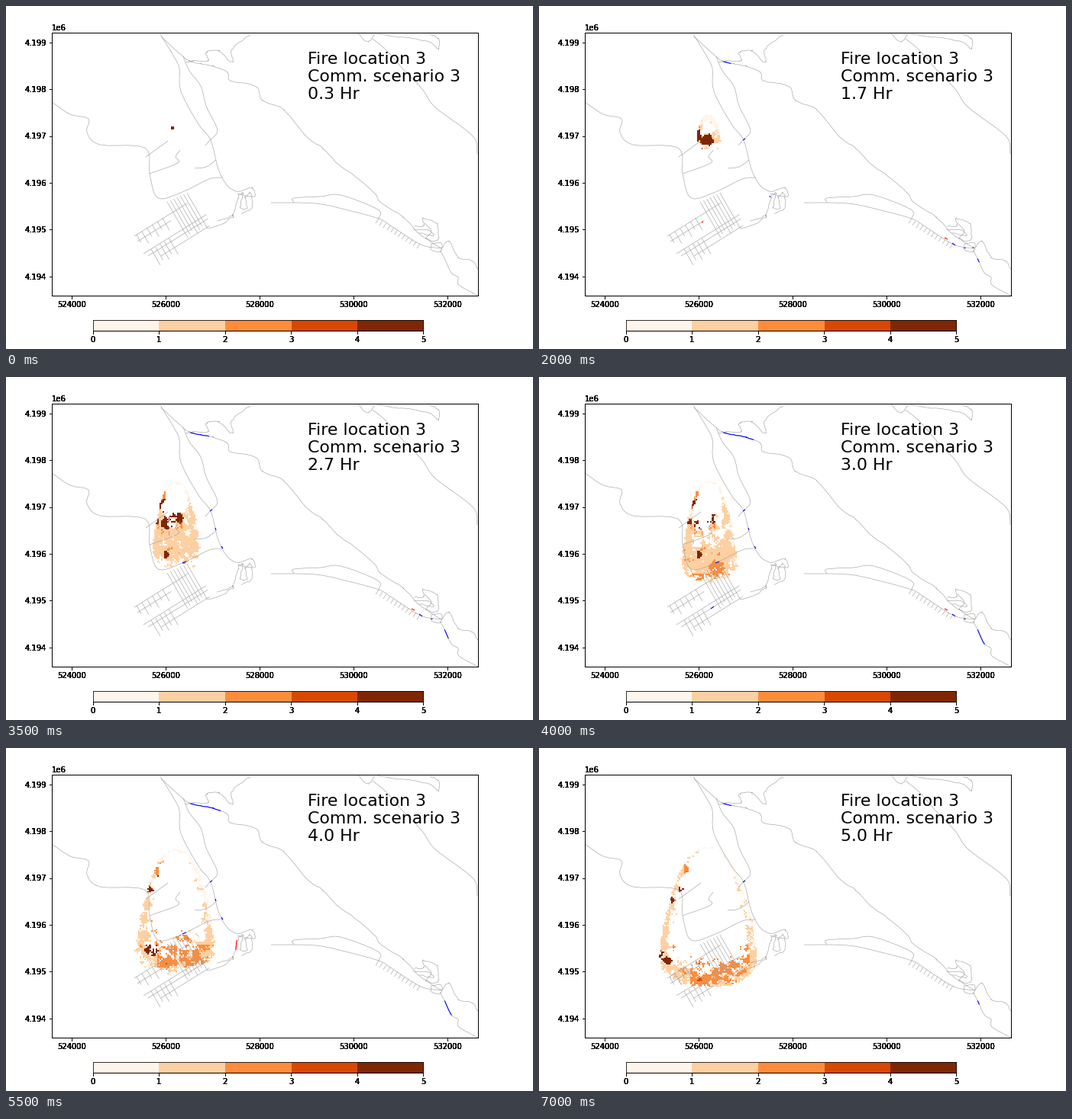
These frames come from a looping animation (690x450 px, 7500 ms). A matplotlib script:

```python
import matplotlib.pyplot as plt
import numpy as np
from matplotlib.animation import FuncAnimation
from matplotlib.collections import LineCollection

W, H = 690, 450
FRAMES, INTERVAL = 15, 500
LEFT, TOP, RIGHT, BOTTOM = 60, 35.3, 618, 380.3
CELL, COLS, ROWS = 1.85, 86, 108
X0, Y0 = 140.15, 119.15

rng = np.random.default_rng(3)
plt.rcParams["font.family"] = "DejaVu Sans"
fig = plt.figure(figsize=(W / 72, H / 72), dpi=72, facecolor="white")
cmap = plt.get_cmap("Oranges", 5)


def axes(left, top, right, bottom):
    ax = fig.add_axes([left / W, 1 - bottom / H, (right - left) / W, (bottom - top) / H])
    ax.patch.set_visible(False)
    return ax


def map_axes():
    """Axes over the map, measured in stage pixels."""
    ax = axes(LEFT, TOP, RIGHT, BOTTOM)
    ax.set(xlim=(LEFT, RIGHT), ylim=(BOTTOM, TOP))
    ax.set_xticks([86 + 122.9 * k for k in range(5)],
                  [str(524000 + 2000 * k) for k in range(5)])
    ax.set_yticks([47.7 + 61.4 * k for k in range(6)],
                  [f"{4.199 - k / 1000:.3f}" for k in range(6)])
    ax.text(LEFT, 32, "1e6", fontsize=10)
    return ax


def bar_axes():
    ax = axes(113.8, 412, 546.2, 426.2)
    ax.imshow([np.arange(5) + 0.5], cmap=cmap, vmin=0, vmax=5,
              extent=(0, 5, 0, 1), aspect="auto", interpolation="nearest")
    ax.set_xticks(range(6))
    ax.set_yticks([])


ax = map_axes()
# Overprinted labels give the heavy tick text.
for _ in range(6):
    map_axes()
    bar_axes()

# ---- roads ----
roads = []


def road(*p, windy=0.0):
    """Smooth curve through a few points, with optional small bends."""
    p = np.reshape(p, (-1, 2)).astype(float)
    if len(p) > 2:
        p = np.vstack([2 * p[0] - p[1], p, 2 * p[-1] - p[-2]])
        a, b, c, d = p[:-3], p[1:-2], p[2:-1], p[3:]
        t = np.linspace(0, 1, 6)[:, None, None]
        q = b + t / 2 * (c - a + t * (2 * a - 5 * b + 4 * c - d
                                      + t * (3 * (b - c) + d - a)))
        p = q.swapaxes(0, 1).reshape(-1, 2)
        p += rng.normal(0, 1, p.shape) * windy
    roads.append(p)
    return p


def street(x, y, length, across=False):
    dx, dy = (0.5, 0.87) if across else (0.85, -0.53)
    road(x, y, x + dx * length, y + dy * length)


# valley and ridge
road(202, 37, 219, 65, 227, 82, 229, 112, 252, 155, 268, 176, 278, 214,
     290, 236, 303, 244)
ridge = road(203, 40, 225, 60, 240, 72, 255, 76, 271, 79, 290, 87, 294, 98,
             327, 105, 336, 124, 364, 136, 392, 170, 415, 187, 434, 207,
             451, 219, 482, 245, 490, 257, 520, 277, 540, 298, 570, 318, windy=0.3)
road(232, 66, 240, 85, 255, 105, 262, 131, 275, 157, 276, 167, 268, 175, 261, 183)
road(235, 74, 246, 72)
road(240, 72, 264, 71, 263, 60, 279, 59, 297, 74, 296, 56, 320, 37, windy=0.8)
# north-east
road(460, 36, 474, 47, 483, 37, windy=0.4)
road(486, 36, 512, 40, 552, 46, 566, 56, 566, 42, 555, 37, windy=0.6)
road(480, 43, 498, 58, 520, 83, 545, 109, 561, 132, 600, 161, 615, 176, 617, 194)
# west
road(60, 126, 84, 142, 108, 148, 106, 166, 123, 182, 182, 186, 188, 220,
     199, 252, 231, 244, 266, 227, 284, 225)
road(183, 198, 212, 177)
road(188, 220, 225, 206, 222, 198, 228, 189)
road(247, 213, 262, 211, 275, 202)
# town grid
for x, y, n in [(168, 302, 82), (172, 309, 52), (180, 325, 97), (186, 328, 92),
                (203, 328, 75)]:
    street(x, y, n)
for k in range(7):
    street(211 + 4.3 * k, 257 - 2 * k, 54 - k % 3 * 3, True)
for k in range(6):
    street(171 + 6.8 * k, 300 - 4.3 * k, 12 + k % 2 * 6, True)
for k in range(5):
    street(190 + 5.8 * k, 319 - 3.6 * k + k % 2, 24 - k % 2 * 5, True)
# coves
road(265, 292, 290, 282, 297, 275, 276, 283, windy=0.8)
road(297, 278, 304, 252, 310, 246, 307, 264, 316, 264, 313, 251, 320, 246,
     322, 264, 308, 272, windy=0.7)
road(303, 244, 322, 239, 325, 250, 303, 246, windy=0.4)
# east corridor
road(347, 258, 405, 259, 448, 268, 488, 279, 505, 289, 543, 313, 570, 318)
road(377, 258, 377, 252, 412, 250, 438, 248, 487, 267, 488, 279)
for k in range(12):
    x, y = 488 + 4.9 * k, 279 + 3 * k
    road(x, y, x - 4, y + 6)
road(534, 289, 547, 288, 546, 279, 564, 286, 565, 307, 550, 305, 557, 296,
     548, 284, windy=0.5)
road(533, 293, 552, 294, 560, 301, 541, 298, windy=0.4)
road(557, 312, 570, 311, 569, 322, 557, 320, 557, 312)
south = road(568, 320, 574, 331, 583, 350, 592, 356, 593, 366, 618, 380)
road(570, 318, 580, 309, 592, 330, 610, 334, 618, 346, windy=0.4)
ax.add_collection(LineCollection(roads, colors="#a0a0a0", linewidths=0.6, zorder=2))

# ---- traffic ----
# colour, x, y, dx, dy, first and last busy frame
JAMS = [
    ("blue", 267, 176, 3, -2, 2, 14), ("blue", 274, 198, 1, 3, 5, 12),
    ("blue", 282, 222, 2, 3, 6, 11), ("blue", 231, 244, 5, -2, 6, 11),
    ("red", 531, 304, 4, 2, 2, 8), ("blue", 541, 311, 4, 3, 3, 9),
    ("red", 568, 318, 1, -2, 2, 4), ("blue", 556, 317, 2, 0, 4, 8),
    ("red", 213, 284, 2, -1, 2, 4), ("blue", 302, 249, 1, 2, 3, 5),
    ("blue", 225, 304, 4, -3, 8, 9), ("red", 302, 252, -1, 13, 10, 11),
]


def clip(route, start, length):
    s = np.r_[0, np.cumsum(np.hypot(*np.diff(route, axis=0).T))]
    t = np.linspace(start, start + length, 30)
    return np.c_[np.interp(t, s, route[:, 0]), np.interp(t, s, route[:, 1])]


def traffic(i):
    swell = np.exp(-((i - 9.5) / 2.3) ** 2)
    segs = []
    if i > 0:
        segs.append((clip(ridge, 52, 10 + 52 * swell), "blue"))
    if i > 1:
        segs.append((clip(south, 13, 5 + 25 * swell), "blue"))
    segs += [([(x, y), (x + dx, y + dy)], c)
             for c, x, y, dx, dy, first, last in JAMS if first <= i <= last]
    return segs


# ---- fire ----
gx, gy = np.meshgrid(X0 + CELL * (np.arange(COLS) + 0.5),
                     Y0 + CELL * (np.arange(ROWS) + 0.5))


def noise(blur):
    n = rng.random((ROWS, COLS))
    for _ in range(blur):
        n = (n + sum(np.roll(n, s, a) for s in (-1, 1) for a in (0, 1))) / 5
    return (n - n.mean()) / n.std()


def extent(t):
    """Left, right, top and bottom of the burnt area."""
    return [np.interp(t, (0, 4, 8, 14), e) for e in
            ((216, 205, 186, 154), (220, 238, 260, 288),
             (158, 142, 136, 130), (161, 183, 266, 314))]


fine, coarse = noise(1), noise(6)

# When the egg-shaped front reaches each cell, and how far down the egg it is.
arrival = np.full((ROWS, COLS), np.inf)
depth = np.zeros((ROWS, COLS))
for t in np.linspace(14.5, 0, 146):
    l, r, top, bottom = extent(t)
    v = np.clip((gy - top) / (bottom - top), 0, 1)
    half = 0.55 * (r - l) * v ** 0.4 * np.sqrt(1 - v ** 10)
    inside = np.abs(gx - (l + r) / 2) < half
    arrival[inside] = t
    depth[inside] = v[inside]
arrival *= 1 + 0.04 * fine

town = (gx > 197) & (gx < 276) & (gy > 258)
span = np.clip(1.6 + 1.1 * depth + 0.6 * coarse + (0.25 + 0.6 * town) * fine, 0.5, 4)
heat = (0.45 + 1.0 * depth + 0.3 * (gx < 215) + 0.6 * town
        + 0.2 * fine + 0.2 * coarse)

# Dense fuel: x, y, radius, extra heat
for x, y, size, extra in [(217, 160, 3, 4), (207, 168, 8, 4), (219, 177, 8, 4),
                          (211, 191, 8, 4), (227, 187, 5, 4), (200, 158, 10, 1.3),
                          (196, 189, 4, 3), (209, 233, 4, 3), (233, 253, 10, 0.8),
                          (187, 185, 4, 3), (174, 200, 4, 4), (189, 265, 8, 4),
                          (167, 279, 6, 4), (158, 270, 5, 4)]:
    heat += extra * (np.hypot(gx - x, gy - y) < size * (1 + 0.15 * fine))
heat = np.clip(heat, 0, 4.99)


def fire(i):
    age = i - arrival
    return np.ma.masked_where((age < 0) | (age > span), heat)


burn = ax.imshow(fire(0), cmap=cmap, vmin=0, vmax=5, interpolation="nearest",
                 aspect="auto", zorder=1,
                 extent=(X0, X0 + CELL * COLS, Y0 + CELL * ROWS, Y0))
ax.set(xlim=(LEFT, RIGHT), ylim=(BOTTOM, TOP))
jams = ax.add_collection(LineCollection([], linewidths=1.1, zorder=3))
label = ax.text(395.3, 122.4, "", fontsize=22, va="baseline", zorder=5)


def update(i):
    burn.set_data(fire(i))
    label.set_text(f"Fire location 3\nComm. scenario 3\n{(i + 1) / 3:.1f} Hr")
    segs = traffic(i)
    jams.set_segments([s for s, _ in segs])
    jams.set_color([c for _, c in segs] or ["blue"])
    return burn, label, jams


anim = FuncAnimation(fig, update, frames=FRAMES, interval=INTERVAL, repeat=True)
plt.show()
```
